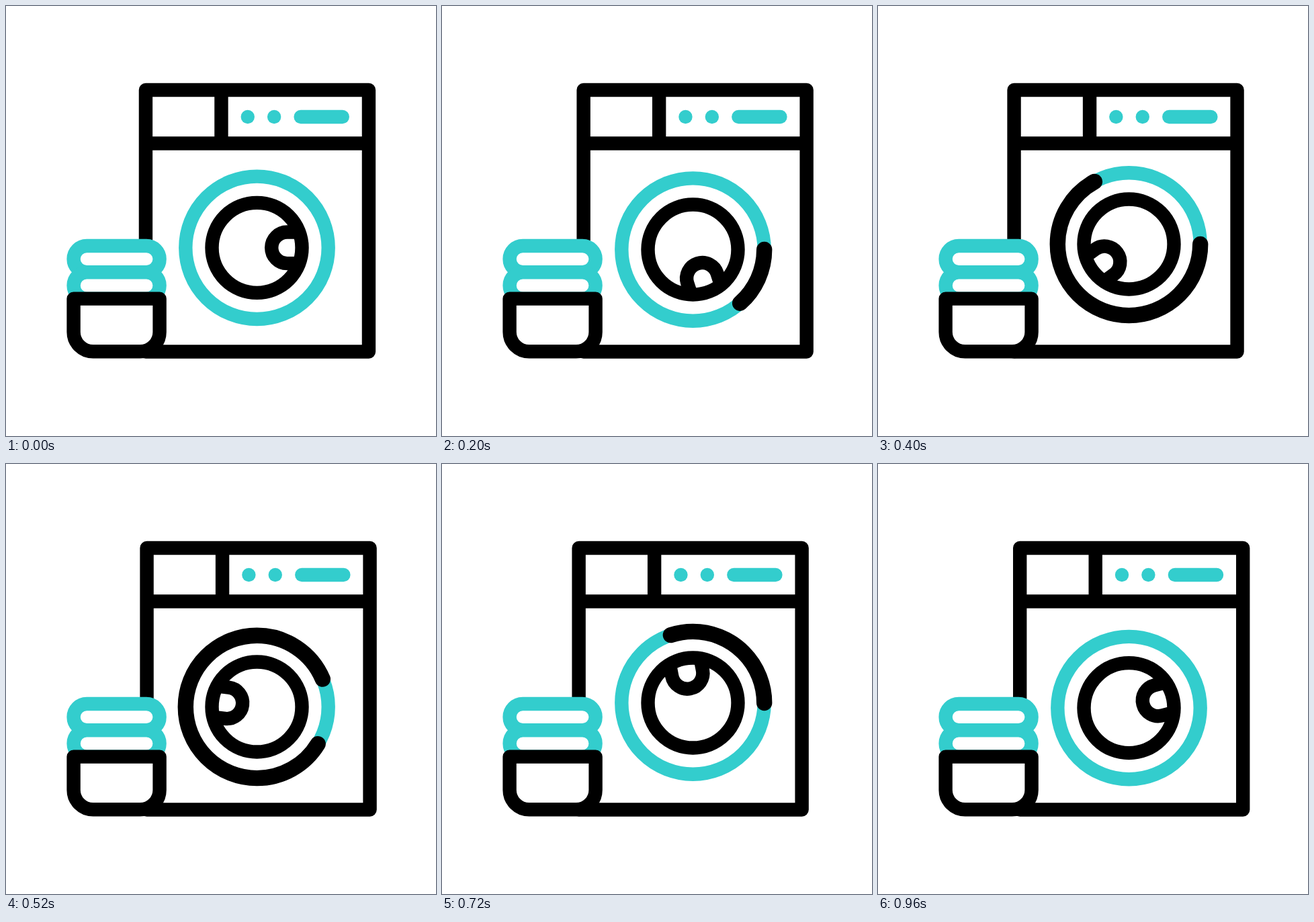
An HTML page that plays this animation: 640 px wide and 640 px high, repeating every 1 s.

```html
<!DOCTYPE html>
<html lang="en">
<head>
<meta charset="utf-8">
<title>Washing machine</title>
<style>
  html, body { margin: 0; width: 100%; height: 100%; overflow: hidden; background: #fff; }
  svg { display: block; width: 100%; height: 100%; }
  .line { fill: none; stroke-width: 20.4; stroke-linejoin: round; stroke-linecap: butt; }
  .ink { stroke: #000; }
  .aqua { stroke: #33cdcd; }
  .dot { fill: #33cdcd; }
  .paper { fill: #fff; }
</style>
</head>
<body>
<svg viewBox="0 0 640 640">
  <g id="body">
    <path class="line ink" d="M207.5 125H539.5V514.5H207.5ZM207.5 204.5H539.5M320 125V204.5"/>
    <circle class="dot" cx="359.3" cy="165" r="10.2"/>
    <circle class="dot" cx="398.7" cy="165" r="10.2"/>
    <rect class="dot" x="428" y="154.8" width="82.5" height="20.4" rx="10.2"/>
  </g>

  <g id="door">
    <circle class="line aqua" r="106.2"/>
    <circle id="arc" class="line ink" r="106.2" pathLength="360"
            style="stroke-width:23.4;stroke-linecap:round"/>
    <circle class="line ink" r="67"/>
    <path id="bump" class="line ink" d="M62 -23.3H45A23.3 23.3 0 0 0 45 23.3H62"/>
  </g>

  <g id="laundry">
    <rect class="line aqua paper" x="100.6" y="357" width="128" height="39.3" rx="19.6"/>
    <rect class="line aqua paper" x="100.6" y="396.3" width="128" height="39.3" rx="19.6"/>
    <path class="line ink paper"
          d="M100.6 435.6H228.6V485.3A29 29 0 0 1 199.6 514.3H129.6A29 29 0 0 1 100.6 485.3Z"/>
  </g>
</svg>
<script>
  const LOOP = 1000, STEP = 40;
  const [body, door, arc, bump] = ["body", "door", "arc", "bump"].map(id => document.getElementById(id));

  // Eased 0..1 progress between two times
  function ease(t, from, to) {
    const p = Math.min(1, Math.max(0, (t - from) / (to - from)));
    return p * p * (3 - 2 * p);
  }

  // Triangle wave, three cycles per loop, falling first
  function shake(t) {
    const p = (3 * t / LOOP + 0.25) % 1;
    return 0.45 + 6.75 * (4 * Math.abs(p - 0.5) - 1);
  }

  function draw(t) {
    const d = shake(t);
    body.setAttribute("transform", `translate(${d} 0)`);
    door.setAttribute("transform", `translate(373.5 ${359.4 + d})`);
    bump.setAttribute("transform", `rotate(${360 * t / LOOP})`);

    const head = 360 * ease(t, 80, 600);
    const tail = 360 * ease(t, 440, 880);
    const span = head - tail;
    arc.style.display = span > 0.01 ? "" : "none";
    arc.setAttribute("stroke-dasharray", `${span} 720`);
    arc.setAttribute("stroke-dashoffset", -tail);
  }

  const start = performance.now();
  function tick() {
    const t = (performance.now() - start) % LOOP;
    draw(Math.floor(t / STEP) * STEP);
    requestAnimationFrame(tick);
  }
  tick();
</script>
</body>
</html>
```
